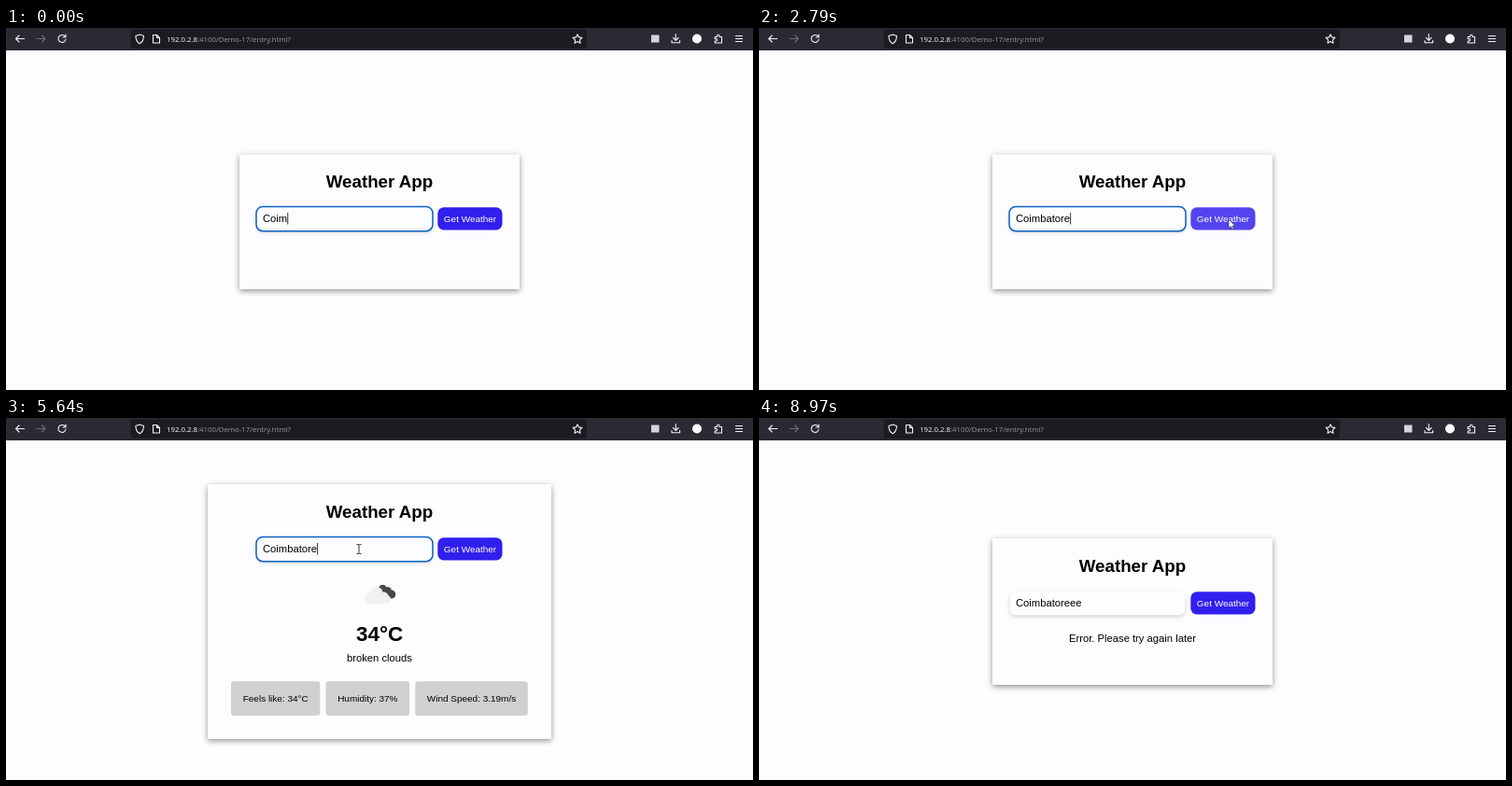
An HTML page that plays this animation: 800x388 px, repeating every 9000 ms.

```html
<!DOCTYPE html>
<html lang="en">
<head>
<meta charset="utf-8">
<title>Weather App</title>
<style>
  html, body { margin: 0; width: 100%; height: 100%; overflow: hidden; background: #fdfcfe; }
  svg { display: block; width: 800px; height: 388px; font: 11.245px "Liberation Sans", Arial, sans-serif; }
  .mid { text-anchor: middle; }
  .small { font-size: 9.97px; }
  .bold { font-weight: bold; }
  .url { font: 7.8px "Open Sans", "Noto Sans", sans-serif; }
  .icons { fill: none; stroke: #f3f2f7; stroke-width: 1.1; stroke-linecap: round; stroke-linejoin: round; }
  #card { fill: #fdfcfe; filter: drop-shadow(0 2.5px 3px rgba(0, 0, 0, .42)); }
  #field { fill: #fdfcfe; filter: drop-shadow(0 2px 2.2px rgba(0, 0, 0, .17)); }
  #ring { fill: none; stroke: #0a62c4; stroke-width: 1.5; }
</style>
</head>
<body>
<svg viewBox="0 0 800 388">
  <rect width="800" height="388" fill="#fdfcfe"/>

  <!-- browser bar -->
  <rect width="800" height="24" fill="#2b2a33"/>
  <rect x="133.5" y="1.5" width="488.500" height="20.500" rx="3" fill="#1c1b22"/>
  <g class="icons">
    <path d="M19.500 11.500H10.500M14 8l-3.500 3.500L14 15"/>
    <path d="M33 11.500H42M38.500 8l3.500 3.500L38.500 15" stroke="#6d6c75"/>
    <path d="M63 8.700A4 4 0 1 0 64 12.200M64 7v3h-3"/>
    <path d="M143.200 7l4.300 1.500c0 4-1 6.300-4.300 8.200c-3.300-1.900-4.300-4.200-4.300-8.200z"/>
    <path d="M157.500 7.500h4l3 3v5.500h-7zM161.500 7.500v3h3"/>
    <path d="M612 6.800l1.500 3.100 3.400.5-2.500 2.400.6 3.400-3-1.600-3 1.600.6-3.400-2.500-2.400 3.400-.5z"/>
    <path d="M717.300 6.500v6.500M714.500 10.500l2.800 2.800 2.800-2.800M713 13.500v2.300h8.600v-2.300"/>
    <path d="M759.200 9.500h2.300v-1a1.300 1.300 0 0 1 2.600 0v1h2.400v6.500h-7.300v-2h1.300a1.200 1.200 0 0 0 0-2.400h-1.300z"/>
    <path d="M781.500 8.500h7M781.500 11.500h7M781.500 14.500h7"/>
  </g>
  <rect x="691" y="7.500" width="8.500" height="8" fill="#d6d5dc"/>
  <circle cx="740" cy="11.500" r="5" fill="#fff"/>
  <text class="url" x="172" y="14.800" fill="#fbfbfe">192.0.2.8<tspan fill="#9a99a1">:4100/Demo-17/entry.html?</tspan></text>

  <rect id="card"/>

  <g id="form">
    <text class="mid bold" x="400" y="171.300" font-size="18.740">Weather App</text>
    <rect id="field" x="268.700" y="192" width="187.600" height="25.300" rx="6.500"/>
    <rect id="ring" x="268" y="191.500" width="189" height="26.200" rx="7"/>
    <text id="city" x="275" y="208.200"></text>
    <rect id="caret" y="198" width=".8" height="12.500"/>
    <rect id="button" x="462.300" y="192.300" width="69.200" height="24.200" rx="6.500"/>
    <text class="mid small" x="497" y="208.200" fill="#fff">Get Weather</text>
  </g>

  <g id="result">
    <g fill="#484848">
      <circle cx="403.300" cy="183.300" r="4.500"/>
      <circle cx="408.500" cy="185.500" r="4.500"/>
      <circle cx="412.800" cy="189" r="4.500"/>
      <circle cx="407" cy="189" r="4"/>
    </g>
    <g fill="#f0f0f0">
      <circle cx="397" cy="187.800" r="6.800"/>
      <circle cx="390.500" cy="191" r="4.800"/>
      <circle cx="404.500" cy="191.500" r="5"/>
      <rect x="384" y="189.800" width="28" height="9.200" rx="4.600"/>
    </g>
    <text class="mid bold" x="400" y="239.300" font-size="22.490">34°C</text>
    <text class="mid" x="400" y="261">broken clouds</text>
    <g fill="#d0d0d0">
      <rect x="241" y="282.300" width="95.300" height="36.700" rx="3"/>
      <rect x="342.500" y="282.300" width="89.600" height="36.700" rx="3"/>
      <rect x="438.300" y="282.300" width="120.500" height="36.700" rx="3"/>
    </g>
    <g class="mid small">
      <text x="288.700" y="304.300">Feels like: 34°C</text>
      <text x="387.300" y="304.300">Humidity: 37%</text>
      <text x="498.500" y="304.300">Wind Speed: 3.19m/s</text>
    </g>
  </g>

  <text id="error" class="mid" x="400" y="240">Error. Please try again later</text>

  <path id="arrow" d="M0 0V9.600L2.300 7.500 3.800 10.800 5.300 10.100 3.900 7H7z" fill="#fff" stroke="#222" stroke-width=".6"/>
  <path id="beam" d="M-2.500-5H-.6L0-4.500.6-5H2.500M0-4.500V4.500M-2.500 5H-.6L0 4.500.6 5H2.500" fill="none" stroke="#222" stroke-width=".9"/>
</svg>
<script>
const LOOP = 9000;
const WORD = "Coimbatoreee";
const KEYS = [240, 480, 720, 940, 1180, 1450, 6000, 6250]; // key presses after "Coim"
const FOCUS = 5300, BLUR = [2850, 7500];
const LAYOUTS = [
  { from: 0, card: [250, 135.500, 300, 144.500], dy: 0 },
  { from: 3150, card: [216, 71, 368, 273], dy: -64 },
  { from: 7900, card: [250, 129, 300, 157], dy: -6 }
];
const PATH = [ // pointer: time, x, y
  [1900, 405, 217], [2500, 503, 205], [4700, 503, 205], [5250, 378, 140.500],
  [6700, 378, 140.500], [7300, 483, 141], [8350, 483, 141], [8800, 560, -16]
];

const $ = id => document.getElementById(id);
const set = (id, attrs) => { for (const k in attrs) $(id).setAttribute(k, attrs[k]); };
const show = (id, on) => { $(id).style.display = on ? "" : "none"; };
const ease = p => p * p * (3 - 2 * p);

function pointerAt(t) {
  const i = PATH.findIndex(p => p[0] > t);
  if (i < 1 || (t >= KEYS[6] && t < 6700)) return null; // hidden while typing
  const [t0, x0, y0] = PATH[i - 1], [t1, x1, y1] = PATH[i];
  const p = ease((t - t0) / (t1 - t0));
  return [x0 + (x1 - x0) * p, y0 + (y1 - y0) * p];
}

function draw(t) {
  const stage = LAYOUTS.filter(l => t >= l.from).length - 1;
  const { card: [x, y, width, height], dy } = LAYOUTS[stage];
  set("card", { x, y, width, height });
  set("form", { transform: `translate(0 ${dy})` });
  show("result", stage === 1);
  show("error", stage === 2);

  const typed = KEYS.filter(k => t >= k);
  $("city").textContent = WORD.slice(0, 4 + typed.length);
  const focused = t < BLUR[0] || (t >= FOCUS && t < BLUR[1]);
  const since = t - Math.max(0, ...typed, t >= FOCUS ? FOCUS : 0);
  show("ring", focused);
  show("caret", focused && since % 1060 < 530);
  set("caret", { x: 275.200 + $("city").getComputedTextLength() });

  const pos = pointerAt(t);
  const over = (left, right, top, bottom) => pos && pos[0] > left && pos[0] < right
    && pos[1] - dy > top && pos[1] - dy < bottom;
  const onField = over(268, 457, 191, 218);
  set("button", { fill: over(462, 532, 192, 217) ? "#5344f0" : "#311fed" });
  show("arrow", pos && !onField);
  show("beam", pos && onField);
  if (pos) set(onField ? "beam" : "arrow", { transform: `translate(${pos})` });
}

const start = performance.now();
function frame() {
  draw((performance.now() - start) % LOOP);
  requestAnimationFrame(frame);
}
frame();
</script>
</body>
</html>
```
